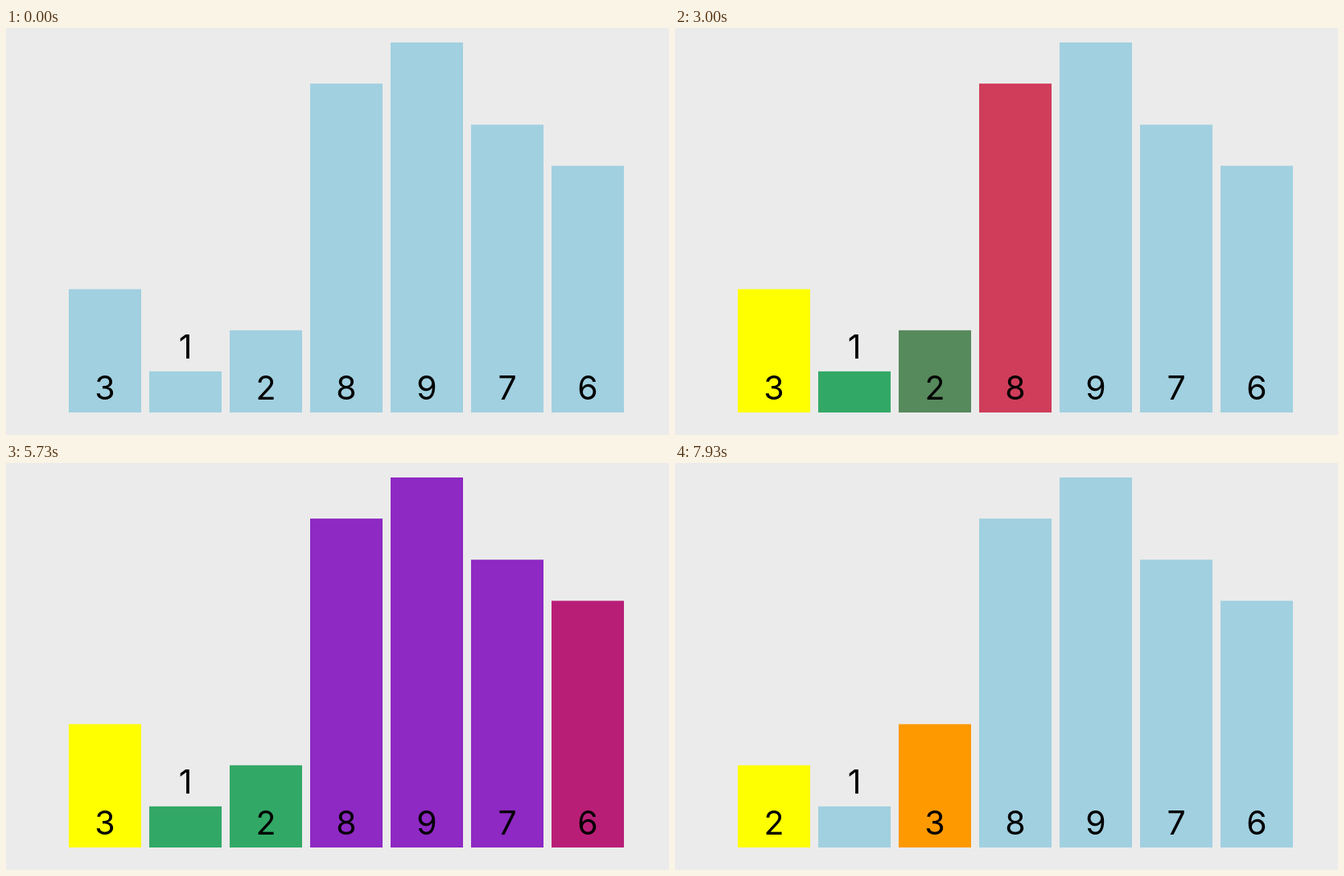
An HTML page with a canvas for the animation above (8000 ms loop, 824 px wide and 506 px high).

```html
<!DOCTYPE html>
<html lang="en">
<head>
<meta charset="utf-8">
<title>Quicksort partition</title>
<style>
  html, body { margin: 0; width: 100%; height: 100%; overflow: hidden; background: #ebebeb; }
  canvas { display: block; }
</style>
</head>
<body>
<canvas id="stage" width="824" height="506"></canvas>
<script>
const ctx = document.getElementById('stage').getContext('2d');
const LOOP = 8000, FIRST = 42, STEP = 693, FADE = 300;
const BASE = 478, UNIT = 460 / 9;

const blue = [161, 208, 224], yellow = [255, 255, 0], red = [219, 21, 54],
      green = [50, 168, 102], purple = [142, 41, 195], orange = [255, 153, 0];

// Each colour entry is [step, new colour]; slots are before and after the swap.
const SWAP = 9, RESET = 10;
const bars = [
  { value: 3, from: 0, to: 2, colors: [[0, yellow], [RESET, orange]] },
  { value: 1, from: 1, to: 1, colors: visit(2) },
  { value: 2, from: 2, to: 0, colors: [...visit(3), [11, yellow]] },
  { value: 8, from: 3, to: 3, colors: visit(4) },
  { value: 9, from: 4, to: 4, colors: visit(5) },
  { value: 7, from: 5, to: 5, colors: visit(6) },
  { value: 6, from: 6, to: 6, colors: visit(7) }
];

// A bar is compared, sorted into a side, then cleared.
function visit(step) {
  return [[step, red], [step + 1, step < 4 ? green : purple], [RESET, blue]];
}

// Cubic in-out progress of a step at time t.
function progress(step, t) {
  const u = Math.min(1, Math.max(0, (t - FIRST - step * STEP) / FADE));
  return u < 0.5 ? 4 * u ** 3 : 1 - 4 * (1 - u) ** 3;
}

const mix = (a, b, k) => a + (b - a) * k;

function colorAt(bar, t) {
  const rgb = bar.colors.reduce(
    (now, [step, next]) => now.map((c, i) => mix(c, next[i], progress(step, t))), blue);
  return `rgb(${rgb.map(Math.round)})`;
}

function draw(now) {
  const t = now % LOOP;
  ctx.fillStyle = '#ebebeb';
  ctx.fillRect(0, 0, 824, 506);
  ctx.font = '41px Inter, "Liberation Sans", sans-serif';
  ctx.textAlign = 'center';
  for (const bar of bars) {
    const x = 78 + 100 * mix(bar.from, bar.to, progress(SWAP, t));
    const height = bar.value * UNIT;
    ctx.fillStyle = colorAt(bar, t);
    ctx.fillRect(x, BASE - height, 90, height);
    ctx.fillStyle = '#000';
    ctx.fillText(bar.value, x + 45, bar.value === 1 ? 411 : 462);
  }
  requestAnimationFrame(draw);
}
requestAnimationFrame(draw);
</script>
</body>
</html>
```
